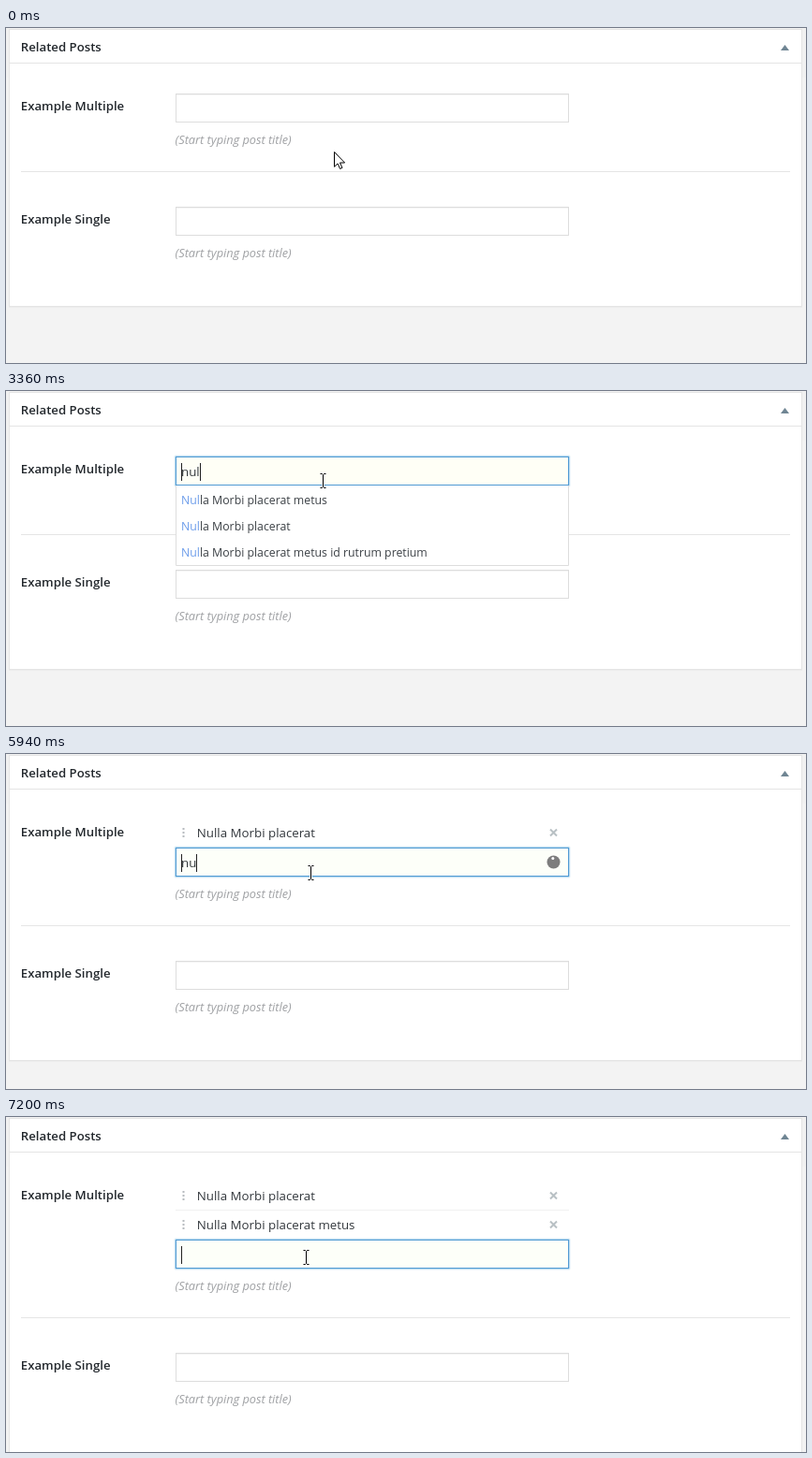
An HTML page that plays this animation: 854 px wide and 358 px high, repeating every 8 s.

```html
<!DOCTYPE html>
<html lang="en">
<head>
<meta charset="utf-8">
<title>Related Posts</title>
<style>
  html, body { margin: 0; width: 100%; height: 100%; overflow: hidden; background: #f3f3f3; }
  svg { display: block; width: 854px; height: 358px; }
  text { font: 13.3px "Open Sans", "Noto Sans", sans-serif; fill: #32373c; white-space: pre; }
  .label { font-weight: 600; font-size: 13.2px; fill: #23282d; }
  .hint { font-style: italic; font-size: 12.8px; fill: #a0a2a5; }
  .option { font-size: 12.3px; fill: #3c4146; }
  .match { fill: #6a9bea; }
  .line { fill: none; stroke: #e5e5e5; }
  .field { fill: #fff; stroke: #ddd; }
  .inset { fill: none; stroke: #f4f4f4; }
  .caret { fill: #222; }
  .cursor path { fill: #fff; stroke: #000; stroke-linejoin: round; }
  .cursor .beam { fill: none; }
  .cursor .halo { fill: none; stroke: #fff; stroke-width: 3; opacity: .8; }
</style>
</head>
<body>
<svg viewBox="0 0 854 358">
  <rect width="854" height="53" fill="#f1f1f1"/>
  <rect id="shade" x="3" y="2" width="847" fill="#ececec"/>
  <rect id="panel" x="3.5" y="1.5" width="846" fill="#fff" stroke="#e5e5e5"/>
  <path class="line" d="M4 37.5H849"/>
  <text class="label" x="15.8" y="25">Related Posts</text>
  <path d="M827 24l4.5-6 4.5 6z" fill="#6f8593"/>
  <text class="label" x="15.8" y="88">Example Multiple</text>
  <g id="chosen"></g>

  <g id="body">
    <g id="glow" fill="none" stroke="#3f9bd0">
      <rect x="179.5" y="68.5" width="423" height="34" rx="2" opacity=".08"/>
      <rect x="180.5" y="69.5" width="421" height="32" rx="1" opacity=".35"/>
    </g>
    <rect id="field" class="field" x="181.5" y="70.5" width="419" height="30"/>
    <path id="inset" class="inset" d="M182 71.5H600"/>
    <text id="typed" x="187" y="91"></text>
    <rect id="home" class="caret" x="187" y="77" width="1" height="19"/>
    <rect id="caret" class="caret" y="77" width="1" height="19"/>
    <g id="spinner">
      <circle cx="584.5" cy="85.5" r="7" fill="#7d7d7d"/>
      <circle id="dot" r="1.5" fill="#fff"/>
    </g>
    <text id="hint" class="hint" x="180.6" y="124">(Start typing post title)</text>
    <path class="line" d="M16 153.5H837"/>
    <text class="label" x="15.8" y="209">Example Single</text>
    <rect class="field" x="181.5" y="191.5" width="419" height="30"/>
    <path class="inset" d="M182 192.5H600"/>
    <text class="hint" x="180.6" y="245">(Start typing post title)</text>
    <g id="menu"></g>
  </g>

  <g id="arrow" class="cursor">
    <path d="M.5 .5V16.3L4.1 12.9 6.6 18.5 9 17.4 6.5 12H11.6Z"/>
  </g>
  <g id="beam" class="cursor">
    <path class="halo" d="M-2.5-7.5H-.5L.5-6.5 1.5-7.5H3.5M.5-6.5V6.5M-2.5 7.5H-.5L.5 6.5 1.5 7.5H3.5"/>
    <path class="beam" d="M-2.5-7.5H-.5L.5-6.5 1.5-7.5H3.5M.5-6.5V6.5M-2.5 7.5H-.5L.5 6.5 1.5 7.5H3.5"/>
  </g>
  <g id="hand" class="cursor">
    <path d="M5.5 13V2Q5.5 .5 7 .5T8.5 2V7.2Q9.8 6 11.3 7.2V8.2Q12.8 7.2 14 8.6V9.6Q16.5 9 16.5 11.2V14.5Q16.5 17 14.5 19V21.5H6.5V19.5L3 15.2 .9 12.2Q.4 10.4 2 10.2 3.4 10 5.5 13Z"/>
    <path d="M8.5 7V11M11.3 8V11.5M14 9.5V12" style="fill:none"/>
  </g>
</svg>
<script>
const LOOP = 8000;
const TITLES = [
  "Nulla Morbi placerat metus",
  "Nulla Morbi placerat",
  "Nulla Morbi placerat metus id rutrum pretium"
];

// [time, changed properties]
const STEPS = [
  [0, { typed: "", match: 0, picked: [], menu: false, hover: -1, focus: false, blur: false, caret: true, spin: false }],
  [850, { focus: true }],
  [1860, { typed: "n", match: 1, menu: true }],
  [2020, { typed: "nu", match: 2 }],
  [2320, { typed: "nul", spin: true }],
  [3040, { match: 3, spin: false }],
  [3440, { hover: 0 }],
  [3510, { caret: false }],
  [3990, { caret: true }],
  [4060, { hover: 1 }],
  [4370, { focus: false, blur: true }],
  [4450, { typed: "", picked: [1], menu: false, hover: -1 }],
  [4530, { focus: true, blur: false }],
  [5470, { typed: "n" }],
  [5550, { spin: true }],
  [5630, { typed: "nu" }],
  [6340, { match: 2, menu: true, spin: false }],
  [6650, { hover: 0 }],
  [7040, { focus: false, blur: true }],
  [7120, { typed: "", picked: [1, 0], menu: false, hover: -1 }],
  [7200, { focus: true, blur: false }]
];

// [time, shape, x, y]
const POINTER = [
  [0, "arrow", 350, 132], [380, "arrow", 349, 125], [460, "arrow", 346, 108],
  [540, "beam", 344, 92], [620, "beam", 343, 86],
  [3360, "beam", 338, 96], [3440, "hand", 328, 106], [3510, "hand", 326, 112],
  [3990, "hand", 324, 118], [4060, "hand", 321, 128], [4140, "hand", 319, 133],
  [4530, "arrow", 325, 133], [4770, "beam", 325, 129], [4850, "beam", 325, 127],
  [6650, "hand", 318, 134], [6730, "hand", 314, 143], [6810, "hand", 314, 149],
  [7200, "beam", 320, 150]
];

const $ = id => document.getElementById(id);
const show = (id, on) => $(id).setAttribute("visibility", on ? "visible" : "hidden");
const set = (id, name, value) => $(id).setAttribute(name, value);

function menuMarkup({ picked, hover, match }) {
  const rows = TITLES.filter((_, i) => !picked.includes(i));
  const height = rows.length * 28;
  let out = `<rect x="181" y="101" width="420" height="${height + 2}" fill="#fff"/>`;
  rows.forEach((title, i) => {
    const y = 102 + i * 28;
    if (i === hover) out += `<rect x="182" y="${y}" width="418" height="28" fill="#f0f0f0"/>`;
    out += `<text class="option" x="187" y="${y + 19}"><tspan class="match">${title.slice(0, match)}</tspan>${title.slice(match)}</text>`;
  });
  return out + `<path d="M181.5 101V${102.5 + height}H600.5V101" fill="none" stroke="#ddd"/>`;
}

function chosenMarkup({ picked }) {
  return picked.map((id, i) => {
    const y = 84 + i * 31;
    const rule = i ? `<path d="M181 ${y - 15.5}H601" stroke="#f0f0f0"/>` : "";
    return rule +
      `<path d="M189.5 ${y - 5}v2m0 2v2m0 2v2" stroke="#b8bcc0" stroke-width="2"/>` +
      `<text x="203.8" y="${y + 5}">${TITLES[id]}</text>` +
      `<path d="M581 ${y - 3.5}l7 7m0-7l-7 7" stroke="#b8c0c4" stroke-width="2"/>`;
  }).join("");
}

function render(s) {
  const n = s.picked.length;
  const dy = n ? n * 31 - 1 : 0;
  set("panel", "height", 296 + dy);
  set("shade", "height", 297 + dy);
  set("body", "transform", `translate(0 ${dy})`);
  $("chosen").innerHTML = chosenMarkup(s);
  $("menu").innerHTML = s.menu ? menuMarkup(s) : "";
  $("typed").textContent = s.typed;
  show("hint", !s.menu);
  show("glow", s.focus);
  show("inset", !s.focus && !s.blur);
  $("field").style.fill = s.focus ? (n ? "#fdfff9" : "#fffff6") : "#fff";
  $("field").style.stroke = s.focus ? "#509ad4" : s.blur ? "#5b9dd9" : "#ddd";
  show("home", s.focus);
  show("caret", s.focus && s.caret && s.typed);
  set("caret", "x", Math.round(187 + $("typed").getComputedTextLength()));
  show("spinner", s.spin);
}

function placePointer(t) {
  const [, shape, x, y] = POINTER.filter(p => p[0] <= t).pop();
  for (const id of ["arrow", "beam", "hand"]) show(id, id === shape);
  set(shape, "transform", `translate(${x} ${y})`);
}

function turnSpinner(t) {
  const angle = (Math.floor((t - 5940) / 80) * 36 - 100) * Math.PI / 180;
  set("dot", "cx", 584.5 + 4 * Math.cos(angle));
  set("dot", "cy", 85.5 + 4 * Math.sin(angle));
}

let last = -1;
const start = performance.now();

function frame() {
  const t = (performance.now() - start) % LOOP;
  const past = STEPS.filter(step => step[0] <= t);
  if (past.length !== last) {
    last = past.length;
    render(Object.assign({}, ...past.map(step => step[1])));
  }
  placePointer(t);
  turnSpinner(t);
  requestAnimationFrame(frame);
}
frame();
</script>
</body>
</html>
```
